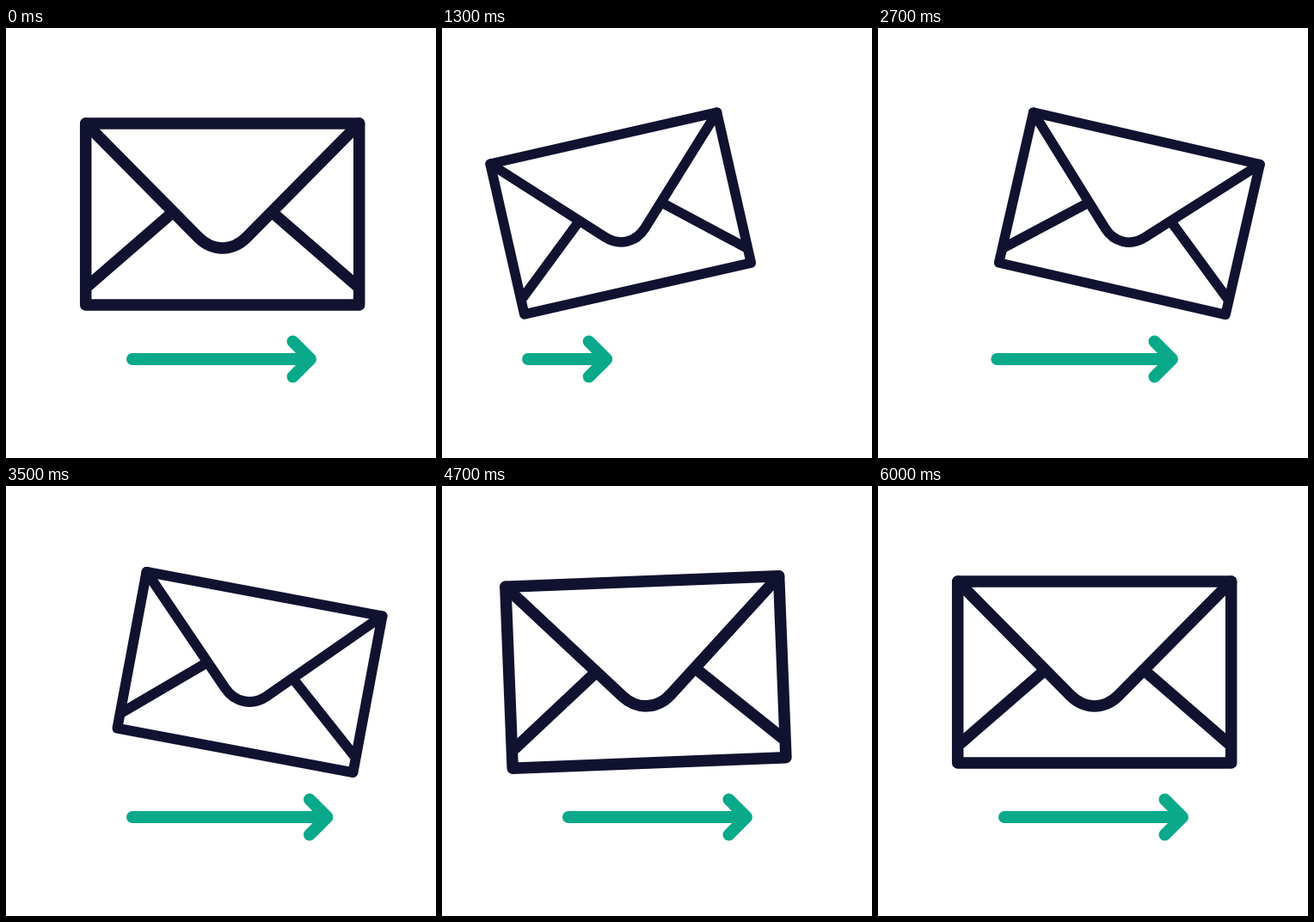
An HTML page that plays this animation: 500 by 500 pixels, repeating every 6100 ms.

```html
<!DOCTYPE html>
<html lang="en">
<head>
<meta charset="utf-8">
<title>Envelope on its way</title>
<style>
  html, body { margin: 0; width: 100%; height: 100%; overflow: hidden; background: #fff; }
  svg { display: block; width: 100vw; height: 100vh; }
  path { fill: none; stroke-linecap: round; stroke-linejoin: round; }
</style>
</head>
<body>
<svg viewBox="0 0 500 500">
  <g id="envelope" stroke="#111230" stroke-width="13.5">
    <path d="M-159 -105.5H159V105.5H-159Z"/>
    <path d="M-159 -105.5L-28 27C-11.5 43.5 11.5 43.5 28 27L159 -105.5"/>
    <path d="M-58 -2L-156 83M58 -2L156 83"/>
  </g>
  <path id="arrow" stroke="#09a98a" stroke-width="14"/>
</svg>
<script>
const LOOP = 6100, STEP = 100;
const envelope = document.getElementById('envelope');
const arrow = document.getElementById('arrow');

// Eased progress from 0 to 1 between two times
function progress(time, start, end) {
  const u = Math.min(Math.max((time - start) / (end - start), 0), 1);
  return (1 - Math.cos(Math.PI * u)) / 2;
}

// Each move adds its share, so the envelope ends where it began
function drawEnvelope(time) {
  const pull = progress(time, 0, 820);
  const push = progress(time, 1090, 2885);
  const back = progress(time, 3106, 4520);
  const rebound = progress(time, 4520, 5190);
  const settle = progress(time, 5190, 6000);

  const x = 251.7 - 47 * pull + 90 * push - 62.5 * back + 28 * rebound - 8.5 * settle;
  const y = 216.5 - 30 * push * (1 - push);
  const angle = -13.7 * pull + 27.3 * push - 16.7 * back + 5 * rebound - 1.9 * settle;
  const scale = 1 - 0.15 * (pull - back);
  envelope.setAttribute('transform', `translate(${x} ${y}) rotate(${angle}) scale(${scale})`);
}

function drawArrow(time) {
  const pull = progress(time, 0, 900);
  const shoot = progress(time, 1250, 3270);
  const settle = progress(time, 3270, 4310);

  const tail = 147 - 47 * (pull - shoot);
  const tip = 354 - 163 * pull + 185 * shoot - 22 * settle;
  arrow.setAttribute('d', `M${tail} 385H${tip}m-20.5 -20.5l20.5 20.5l-20.5 20.5`);
}

const start = performance.now();
function tick() {
  const elapsed = (performance.now() - start) % LOOP;
  const time = Math.floor(elapsed / STEP) * STEP;
  drawEnvelope(time);
  drawArrow(time);
  requestAnimationFrame(tick);
}
tick();
</script>
</body>
</html>
```
